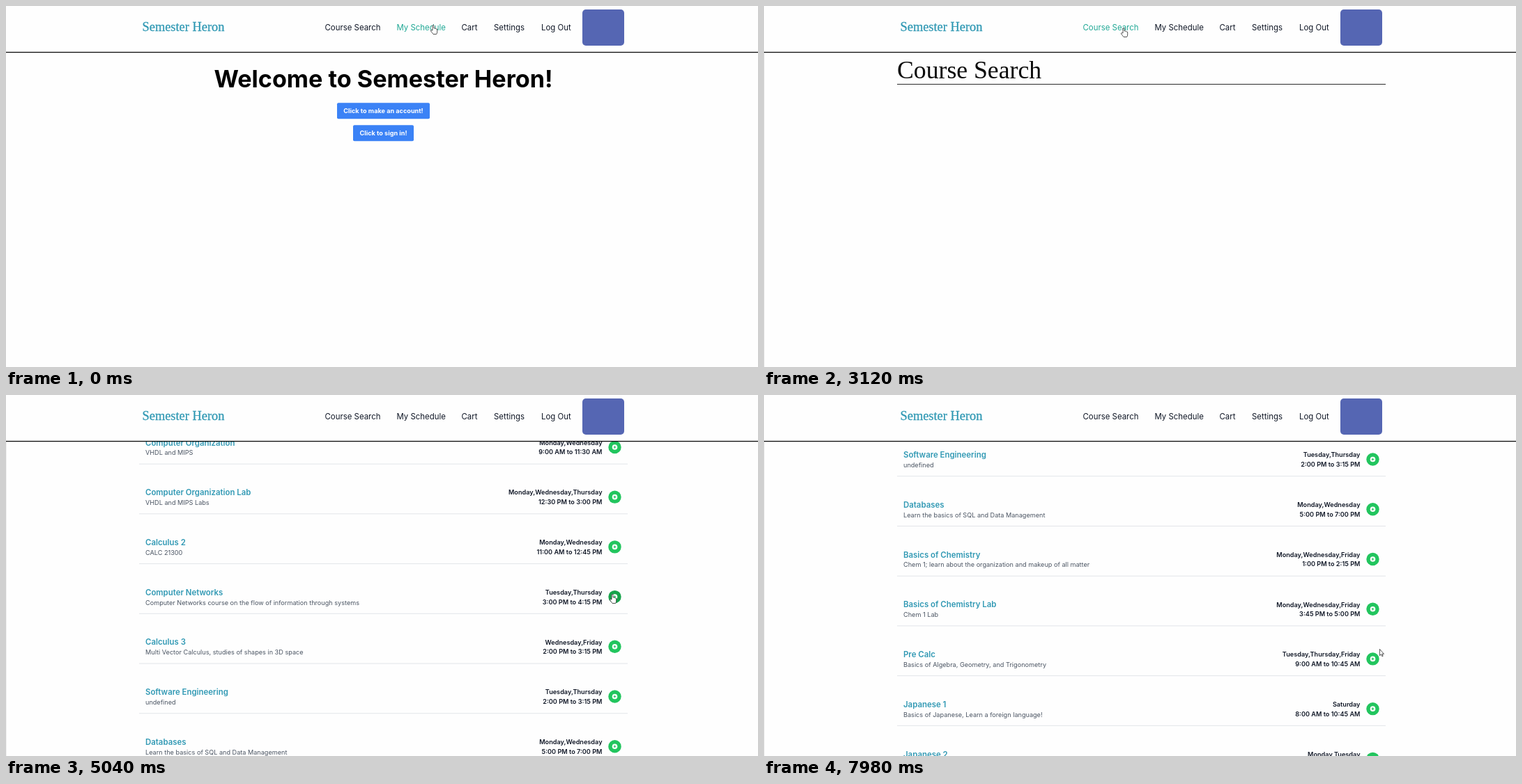
Recreate the animation shown at these times as an HTML page. Size 1079 by 519 pixels, loop 8000 ms.

```html
<!DOCTYPE html>
<html lang="en">
<head>
<meta charset="utf-8">
<title>Semester Heron</title>
<style>
  html, body { margin: 0; width: 100%; height: 100%; overflow: hidden; background: #fefefe; }
  svg { display: block; font-family: Inter, sans-serif; }
  .serif { font-family: "Liberation Serif", serif; }
  .cal { font-family: "Open Sans", sans-serif; }
</style>
</head>
<body>
<svg id="stage" width="1079" height="519" viewBox="0 0 1079 519"></svg>
<script>
const LOOP = 8000;
const PITCH = 71.72;
const BODY = 11.41, SMALL = 9.14;
const TEAL = '#3199b4', BLUE = '#3b82f6', GREEN = '#22c55e', GREEN_DARK = '#16a34a';
const INK = '#111827', HOVER = '#20a895';

const NAV = [['Course Search', 457.5], ['My Schedule', 560.5], ['Cart', 653.5], ['Settings', 700], ['Log Out', 768]];

const COURSES = [
  ['Programming Language Paradigms', 'Scheme', 'Monday,Wednesday,Thursday', '12:30 AM to 1:00 AM'],
  ['Computer Graphics', 'Modern Day computer graphics course', 'Friday', '4:45 PM to 7:00 PM'],
  ['Computer Organization', 'VHDL and MIPS', 'Monday,Wednesday', '9:00 AM to 11:30 AM'],
  ['Computer Organization Lab', 'VHDL and MIPS Labs', 'Monday,Wednesday,Thursday', '12:30 PM to 3:00 PM'],
  ['Calculus 2', 'CALC 21300', 'Monday,Wednesday', '11:00 AM to 12:45 PM'],
  ['Computer Networks', 'Computer Networks course on the flow of information through systems', 'Tuesday,Thursday', '3:00 PM to 4:15 PM'],
  ['Calculus 3', 'Multi Vector Calculus, studies of shapes in 3D space', 'Wednesday,Friday', '2:00 PM to 3:15 PM'],
  ['Software Engineering', 'undefined', 'Tuesday,Thursday', '2:00 PM to 3:15 PM'],
  ['Databases', 'Learn the basics of SQL and Data Management', 'Monday,Wednesday', '5:00 PM to 7:00 PM'],
  ['Basics of Chemistry', 'Chem 1; learn about the organization and makeup of all matter', 'Monday,Wednesday,Friday', '1:00 PM to 2:15 PM'],
  ['Basics of Chemistry Lab', 'Chem 1 Lab', 'Monday,Wednesday,Friday', '3:45 PM to 5:00 PM'],
  ['Pre Calc', 'Basics of Algebra, Geometry, and Trigonometry', 'Tuesday,Thursday,Friday', '9:00 AM to 10:45 AM'],
  ['Japanese 1', 'Basics of Japanese, Learn a foreign language!', 'Saturday', '8:00 AM to 10:45 AM'],
  ['Japanese 2', '', 'Monday,Tuesday', '']
];

// Step tables: each row holds from its time until the next row
const PAGES = [[0, 'welcome'], [1100, 'cart'], [2200, 'week'], [3120, 'search']];
const LINKS = [[0, 1], [120, 2], [1650, 1], [2720, 0], [3510, -1]];
const SCROLL = [
  [0, 0], [3870, 16], [3990, 42], [4110, 57], [4650, 114], [4770, 171], [4920, 205], [5040, 228],
  [5760, 240], [5880, 277], [6000, 308], [6150, 342], [7170, 399], [7290, 434], [7410, 456],
  [7560, 533], [7680, 569]
];
const HOT = [[0, -1], [5040, 5], [5190, -1], [5340, 4], [5760, -1]];
const POINTER = [
  [0, 'hand', 609, 27], [120, 'hand', 660, 31], [270, 'hand', 662, 31], [1500, 'hand', 646, 36],
  [1650, 'hand', 622, 37], [1770, 'hand', 603, 37], [2600, 'hand', 566, 35], [2720, 'hand', 512, 31],
  [3510, 'arrow', 545, 80], [3630, 'arrow', 626, 214], [3750, 'arrow', 675, 302],
  [4260, 'arrow', 735, 291], [4380, 'arrow', 812, 268], [4500, 'beam', 853, 249],
  [4650, 'beam', 856, 256], [4770, 'arrow', 861, 268], [4920, 'arrow', 864, 280], [5040, 'hand', 866, 286],
  [5190, 'arrow', 881, 239], [5340, 'hand', 869, 220], [5490, 'hand', 868, 220],
  [5760, 'arrow', 860, 236], [5880, 'arrow', 843, 256], [6000, 'beam', 827.5, 266.5],
  [6150, 'arrow', 846, 262], [6270, 'arrow', 868, 250], [6390, 'arrow', 888, 236], [6510, 'arrow', 895, 221],
  [6630, 'arrow', 887, 206], [6750, 'arrow', 878, 195], [6870, 'arrow', 870, 189], [7020, 'arrow', 873, 193],
  [7170, 'arrow', 860, 212], [7290, 'beam', 843.5, 229], [7410, 'beam', 848, 252], [7560, 'arrow', 858, 290],
  [7680, 'arrow', 868, 321], [7830, 'arrow', 883, 353], [7980, 'arrow', 883, 365]
];

// y is the middle of the capitals
const text = (x, y, s, size, weight, fill, anchor = 'start', cls = '') =>
  `<text x="${x}" y="${(y + size * (cls === 'serif' ? .33 : .3635)).toFixed(2)}" font-size="${size}" ` +
  `font-weight="${weight}" fill="${fill}" text-anchor="${anchor}" class="${cls}">${s}</text>`;
const rect = (x, y, w, h, fill, r = 0) =>
  `<rect x="${x}" y="${y}" width="${w}" height="${h}" rx="${r}" fill="${fill}"/>`;
const group = (id, body) => `<g id="${id}">${body}</g>`;
const button = (x, y, w, h, label, size, weight, r) =>
  rect(x, y, w, h, BLUE, r) + text(x + w / 2, y + h / 2, label, size, weight, '#fff', 'middle');
const heading = s =>
  text(191, 92, s, 35.7, 400, '#0a0a0a', 'start', 'serif') + rect(191, 112, 701, 1, '#2b2b2b');

function welcomePage() {
  return text(541.5, 104.5, 'Welcome to Semester Heron!', 34.2, 700, '#000', 'middle') +
    button(475, 139.3, 133, 23, 'Click to make an account!', SMALL, 700, 2) +
    button(498, 171.3, 87, 23, 'Click to sign in!', SMALL, 700, 2);
}

function weekPage() {
  const left = 250, gutter = 284, right = 832, col = 78.2, top = 140, hour = 34.15;
  let s = rect(0, 67, 1079, 452, '#f5f7f6') + rect(0, 67, 1079, 61, '#dde0e0') +
    rect(0, 67, 1, 256, '#e3e6e6') +
    text(541.5, 101, 'My Schedule', 20.15, 300, '#000', 'middle') +
    button(250, 94.3, 60, 22, 'Prev Week', 7.6, 600, 3) +
    button(772, 94.3, 60.5, 22, 'Next Week', 7.6, 600, 3) +
    rect(left, 123, right - left, 396, '#f5f7f6');
  for (let i = 0; i < 12; i++) {
    const y = Math.round(top + i * hour);
    s += rect(gutter, Math.round(top + (i + .5) * hour), right - gutter, 1, '#e2e5e5');
    s += rect(gutter, y, right - gutter, 1, '#dadddd') + rect(left, y, gutter - left, 1, '#c6c9c9');
    if (i > 10) continue;
    s += text(272, y + 12.6, (i + 6) % 12 + 1, 11.8, 400, '#333b45', 'end', 'cal') +
      text(282, y + 9.8, i < 5 ? 'AM' : 'PM', 5.7, 400, '#333b45', 'end', 'cal');
  }
  for (let i = 0; i < 8; i++) {
    const x = Math.round(gutter + i * col);
    s += rect(x, 123, 1, 396, i % 7 ? '#dadddd' : '#c6c9c9') + rect(x, 123, 1, 18, '#c6c9c9');
    if (i < 7) s += text(x + col / 2, 133, `8/${i + 4}/2024`, 7.25, 400, '#444', 'middle', 'cal');
  }
  return s + rect(left, 123, 1, 396, '#c2c5c5') + rect(left, 123, right - left, 1, '#c2c5c5') +
    rect(left, top, right - left, 1, '#c2c5c5') + group('bar', rect(823, 271, 9, 239.5, '#5c5d61'));
}

function courseRow([name, about, days, hours], i) {
  return `<g transform="translate(0 ${(i * PITCH).toFixed(2)})">` +
    text(200, 153, name, BODY, 600, TEAL) + text(200, 167.7, about, SMALL, 400, '#4b5563') +
    text(855.5, 153, days, SMALL, 600, INK, 'end') + text(855.5, 166.7, hours, SMALL, 600, INK, 'end') +
    `<circle class="add" cx="873.5" cy="159.5" r="9.2" fill="${GREEN}"/>` +
    '<circle cx="873.5" cy="159.5" r="3.8" fill="#fff"/>' +
    `<path d="M871.7 159.5h3.6M873.5 157.7v3.6" stroke="${GREEN}" stroke-width="1.1"/>` +
    rect(191, 183.2, 701, 1, '#e2e5e9') + '</g>';
}

function searchPage() {
  return rect(0, 67, 1, 452, '#f0f0f0') +
    group('scroller', heading('Course Search') + group('rows', COURSES.map(courseRow).join('')));
}

function header() {
  return rect(0, 0, 1079, 67, '#fefefe') + rect(0, 65.9, 1079, 1.3, '#0b0b0b') +
    `<g stroke="${TEAL}" stroke-width=".3">` +
    text(195.5, 30, 'Semester Heron', 18.4, 400, TEAL, 'start', 'serif') + '</g>' +
    group('nav', NAV.map(([s, x]) => text(x, 31.3, s, BODY, 400, INK)).join('')) +
    rect(827, 5, 60, 52, '#5566b3', 5);
}

function pointers() {
  const shape = (id, d, fill, w) =>
    `<path id="${id}" d="${d}" fill="${fill}" stroke="#2a2a2a" stroke-width="${w}" stroke-linejoin="round"/>`;
  return shape('arrow', 'M.4 .4V9.6L2.5 7.8 3.9 10.8 5.2 10.2 3.9 7.3H6.5Z', '#fff', .8) +
    shape('hand', 'M3 8V1.6Q3 .5 4 .5T5 1.6V5Q6.2 4.4 6.8 5.4 8 5 8.5 6 9.7 5.8 9.7 7V10Q9.7 12 8.6 13.5H4Q2.5 11.5 .6 9 .2 7.8 1.3 7.5Z', '#fff', .8) +
    shape('beam', 'M0 .5H1.6L2.5 1 3.4 .5H5M2.5 1V8.5M0 9H1.6L2.5 8.5 3.4 9H5', 'none', .8);
}

const $ = id => document.getElementById(id);
$('stage').innerHTML =
  group('welcome', welcomePage()) + group('cart', heading('Cart')) +
  group('week', weekPage()) + group('search', searchPage()) + header() + pointers();

const links = [...$('nav').children];
const adds = [...document.querySelectorAll('.add')];
const show = (el, on) => el.setAttribute('display', on ? 'inline' : 'none');
const at = (table, t) => table.findLast(row => row[0] <= t);

function draw(t) {
  const page = at(PAGES, t)[1];
  PAGES.forEach(([, id]) => show($(id), id === page));
  show($('bar'), t < 2600);
  show($('rows'), t >= 3240);
  $('scroller').setAttribute('transform', `translate(0 ${-at(SCROLL, t)[1]})`);

  const link = at(LINKS, t)[1];
  links.forEach((el, i) => el.setAttribute('fill', i === link ? HOVER : INK));

  const hot = at(HOT, t)[1];
  adds.forEach((el, i) => {
    el.setAttribute('fill', i === hot ? GREEN_DARK : GREEN);
    el.setAttribute('stroke', i === 4 && t >= 5490 ? '#ea6a50' : 'none');
    el.setAttribute('stroke-width', 1.4);
  });

  const [, kind, x, y] = at(POINTER, t);
  ['arrow', 'hand', 'beam'].forEach(id => show($(id), id === kind));
  $(kind).setAttribute('transform', `translate(${x} ${y})`);
}

const start = performance.now();
function tick() {
  draw((performance.now() - start) % LOOP);
  requestAnimationFrame(tick);
}
tick();
</script>
</body>
</html>
```
